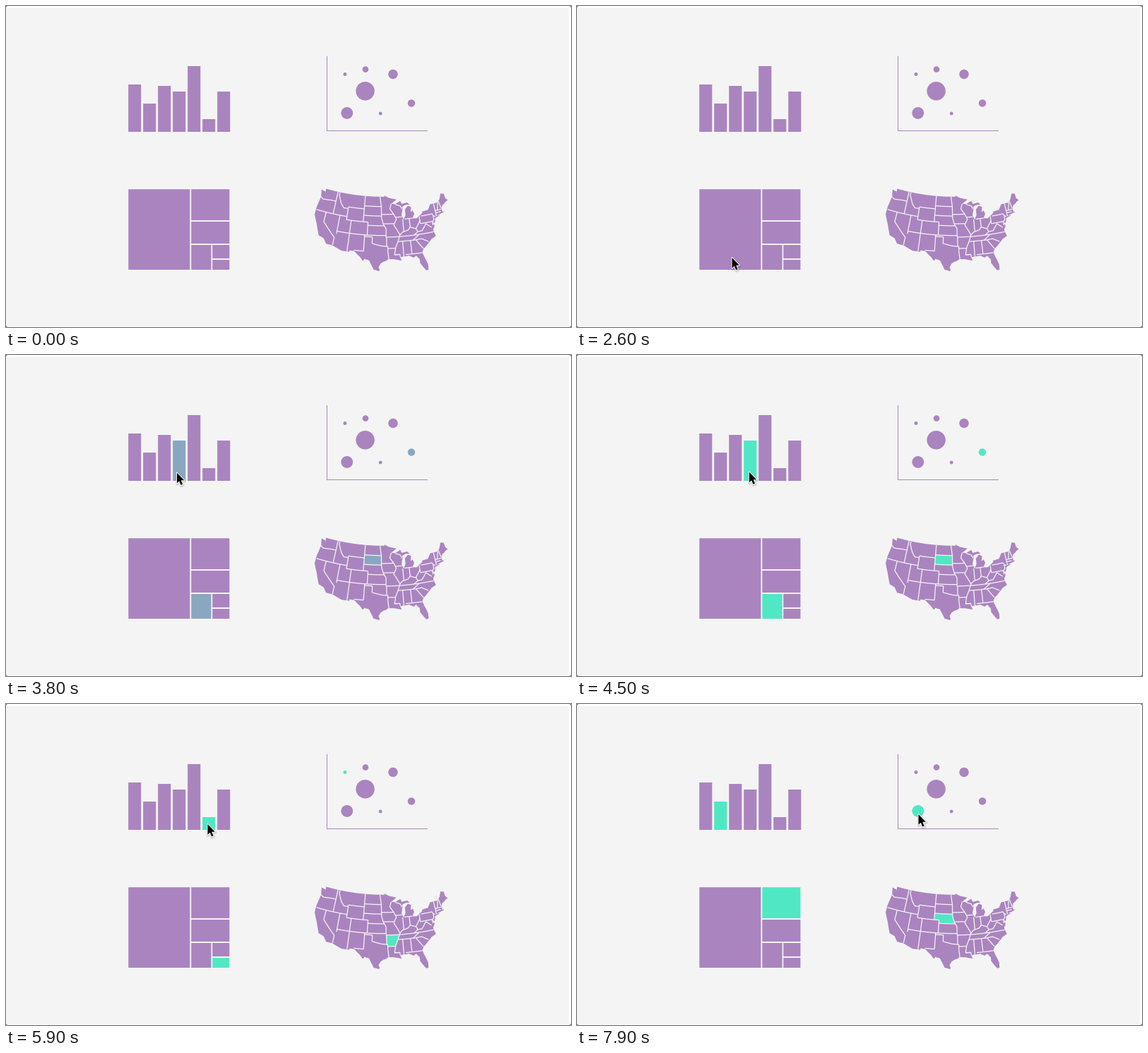
These frames come from a looping animation (800 px wide and 454 px high, 8 s). A matplotlib script:

```python
import numpy as np
import matplotlib.pyplot as plt
from matplotlib.animation import FuncAnimation
from matplotlib.collections import LineCollection
from matplotlib.patches import Circle, FancyBboxPatch, Polygon, Rectangle

W, H, DPI = 800, 454, 100
STEP, FRAMES = 100, 80
PX = 72 / DPI
PAPER = "#f4f4f4"
PURPLE = np.array([170, 132, 191]) / 255
TEAL = np.array([80, 232, 196]) / 255

# Map key points: (degrees west, degrees north)
LAKES = [
    (124.7, 48.38), (122.7, 48.1), (122.5, 47.2), (122.75, 49), (95.15, 49),
    (95.15, 49.38), (93, 48.6), (89.6, 48), (92.1, 46.75), (90.4, 46.6),
    (87.9, 47.47), (87.4, 46.5), (84.9, 46.75), (83.9, 46), (85.5, 46.1),
    (87, 45.75), (88, 44.55), (87.1, 45.2), (87.9, 43), (87.2, 41.65),
    (86.2, 42.9), (86.2, 44.7), (84.7, 45.75), (83.4, 45.2), (83.9, 43.7),
    (82.9, 44.05), (82.45, 43), (83.4, 41.7), (81.7, 41.5), (78.9, 42.9),
    (79.05, 43.27), (76.3, 43.5), (74.9, 45), (71.5, 45), (70.4, 45.8),
    (69.2, 47.45), (67.8, 47.07), (67.8, 45.7),
]
COAST = [
    (67, 44.85), (70, 43.75), (70.7, 42.65), (70.6, 41.8), (70, 42),
    (70, 41.6), (73.6, 41), (72, 41.05), (74, 40.5), (74.9, 38.95),
    (75.5, 39.5), (75.1, 38.3), (76, 36.9), (75.5, 35.25), (77.95, 33.9),
    (80.9, 32.05), (81.45, 30.7), (80.05, 26.8), (80.4, 25.2), (81.15, 25.15),
    (82.75, 27.8), (82.7, 28.9), (83.9, 30.05), (85.3, 29.7), (86.3, 30.4),
    (89.6, 30.15), (89.2, 29.1), (91.8, 29.6), (93.8, 29.7), (96.5, 28.4),
    (97.35, 27.4), (97.15, 25.95), (99.1, 26.4), (100.7, 29.1), (102.4, 29.77),
    (103.1, 28.98), (104.9, 30.6), (106.5, 31.75),
]
PACIFIC = [
    (108.2, 31.78), (108.2, 31.33), (111.07, 31.33), (114.8, 32.5), (117.1, 32.53),
    (118.5, 34.03), (120.6, 34.55), (122.5, 37.75), (124.4, 40.4), (124.5, 42.8),
    (123.95, 46.2), (124.7, 48.38),
]
PLAINS = [(97.2, 49), (96.56, 45.94), (96.45, 42.5), (95.75, 40.6), (94.62, 39.1), (94.62, 36.5)]
MISSISSIPPI = [
    (92.1, 46.75), (92.8, 45.2), (91.2, 43.5), (90.2, 41.9), (91.4, 40.2), (90.2, 38.6),
    (89.15, 37), (90.1, 35), (91.1, 33.2), (91.6, 31), (89.7, 30.99), (89.6, 30.15),
]
WINDING = [
    PLAINS, MISSISSIPPI,
    [(120, 39), (114.63, 35), (114.7, 32.6)],
    [(116.05, 49), (116.05, 48), (114.4, 45.6), (113, 44.45), (111.05, 44.5)],
    [(123.95, 46.2), (122.8, 45.65), (119, 46), (117, 46)],
    [(100, 34.5), (96.5, 33.8), (94.04, 33.6), (94.04, 32), (93.75, 29.7)],
    [(89.15, 37), (88.05, 37.8), (85.7, 38.3), (84.8, 39.1), (82.6, 38.4), (80.52, 40.64)],
    [(90.4, 46.55), (88.1, 45.9), (87.6, 45.1)],
    [(82.6, 38.4), (82, 37.4), (80.3, 37.5), (78.3, 39.4), (76.3, 37.95)],
    [(82, 37.4), (83.7, 36.5)],
    [(81.7, 36.5), (84.3, 35)],
    [(83.1, 35), (81, 35.1), (78.55, 33.87)],
    [(83.2, 35), (80.9, 32.05)],
    [(75, 42), (74.7, 41.36), (74.75, 40.2), (75.5, 39.6)],
    [(74.7, 41.36), (73.9, 41)],
    [(71.5, 45), (72.46, 42.72)],
    [(71.08, 45.3), (70.7, 43.07)],
]
PARALLELS = [  # north, west, east
    (42, 124.2, 111.05), (37, 114.04, 94.62), (45, 111.05, 104.05), (41, 111.05, 102.05),
    (40, 102.05, 95.3), (45.94, 104.05, 96.56), (43, 104.05, 96.45), (43.5, 96.45, 91.2),
    (40.6, 95.75, 91.3), (36.5, 94.62, 75.9), (36.5, 103, 100), (35, 90.1, 83.1),
    (33, 94.04, 91.15), (32, 106.6, 103.04), (31, 91.6, 89.7), (30.8, 87.6, 81.5),
    (42.5, 90.6, 87.8), (41.75, 86.8, 83.4), (39.72, 80.52, 75.6), (42, 79.76, 75),
    (42.04, 73.5, 71.2), (42.72, 73.3, 70.8),
]
MERIDIANS = [  # west, south, north
    (117, 42, 49), (120, 39, 42), (114.04, 36.2, 42), (111.05, 41, 45), (109.05, 31.33, 41),
    (104.05, 41, 49), (103.04, 32, 37), (102.05, 37, 41), (100, 34.5, 36.5),
    (94.45, 33.6, 36.5), (88.3, 30.3, 35), (87.53, 38, 41.7), (85.3, 31, 35),
    (84.81, 39.1, 41.7), (80.52, 39.72, 41.98), (75.6, 38.5, 39.72), (73.4, 41, 45),
]
# Regions that light up, by item: western edge from south to north, eastern river
REGIONS = {
    0: ([(94.62, 36.5), (94.62, 39.1), (95.75, 40.6)], MISSISSIPPI),
    1: ([(102.05, 40), (102.05, 41), (104.05, 41), (104.05, 43)], PLAINS),
    3: ([(104.05, 43), (104.05, 45.94)], PLAINS),
    5: ([(94.04, 33), (94.45, 33.6), (94.62, 36.5)], MISSISSIPPI),
}

BAR_TOPS = [111, 138, 113, 121, 85, 160, 121]
CELLS = [  # left, top, right, bottom
    (173.3, 259.2, 260.4, 373), (262.3, 259.2, 316.4, 303), (262.3, 305, 316.4, 336),
    (262.3, 338, 290.5, 373), (292.3, 338, 316.4, 357), (292.3, 359, 316.4, 373),
]
BUBBLES = [  # x, y, radius
    (508.6, 120.3, 13.2), (482.8, 151.4, 8.4), (548, 96.5, 6.7), (574, 137.5, 5.2),
    (509, 89.6, 4.3), (480, 96.5, 2.5), (530.2, 152, 2.4),
]

# Item, pointer enters, pointer leaves (ms)
HOVERS = [(0, 2650, 3300), (3, 3640, 4500), (5, 5175, 6150), (1, 7450, 9000)]
FADE = 400

# Pointer stops: ms, x, y
STOPS = np.array([
    (1000, 211, 446), (1800, 219, 366), (2600, 220, 357), (3300, 216.7, 231),
    (3800, 242.5, 167.5), (4400, 243, 164), (4900, 262, 188), (5300, 285, 176.5),
    (5900, 286, 171), (6700, 340.5, 227), (7100, 358, 228), (7500, 478, 160),
    (7900, 484, 157),
])
NUDGE = np.array([-0.5, -1])
ARROW = 1.06 * np.array([(0, 0), (0, 14), (3.1, 11.1), (5.3, 16.4), (7.7, 15.4), (5.5, 10.2), (9.8, 10.1)])


def split(points, parts):
    pts = np.array(points, float)
    i = np.arange(len(pts))
    k = np.linspace(0, len(pts) - 1, (len(pts) - 1) * parts + 1)
    return np.column_stack([np.interp(k, i, pts[:, 0]), np.interp(k, i, pts[:, 1])])


def rough(points, size=0.07):
    """Break up a coastline with small seeded offsets."""
    pts = split(points, 3)
    return (pts + np.random.default_rng(4).normal(0, size, pts.shape)).tolist()


def project(points):
    """Albers equal-area conic, subdivided so that parallels curve."""
    west, lat = split(points, 6).T
    s1, s2 = np.sin(np.radians([29.5, 45.5]))
    n = (s1 + s2) / 2
    c = 1 - s1 ** 2 + 2 * n * s1
    rho = np.sqrt(c - 2 * n * np.sin(np.radians(lat))) / n
    theta = n * np.radians(96 - west)
    return np.column_stack([533.2 + 261 * rho * np.sin(theta),
                            -17.8 + 261 * rho * np.cos(theta)])


def region(edge, river):
    """Close a western edge with the stretch of river at the same latitudes."""
    west, lat = np.array(river[::-1]).T
    north = np.linspace(edge[-1][1], edge[0][1], 16)
    bank = list(zip(np.interp(north, lat, west), north))
    return edge + bank + edge[:1]


def smooth(u):
    u = min(max(u, 0), 1)
    return u * u * (3 - 2 * u)


def glow(item, t):
    return max([smooth((t - enter) / FADE) - smooth((t - leave) / FADE)
                for who, enter, leave in HOVERS if who == item], default=0)


def pointer(t):
    """Smooth monotone path through the stops."""
    times, pos = STOPS[:, 0], STOPS[:, 1:]
    speed = np.diff(pos, axis=0) / np.diff(times)[:, None]
    a, b = speed[:-1], speed[1:]
    same = a * b > 0
    slope = np.zeros_like(pos)
    slope[1:-1] = np.where(same, 2 * a * b / np.where(same, a + b, 1), 0)
    i = min(max(np.searchsorted(times, t, "right") - 1, 0), len(times) - 2)
    span = times[i + 1] - times[i]
    u = min(max((t - times[i]) / span, 0), 1)
    s = smooth(u)
    return (pos[i] * (1 - s) + pos[i + 1] * s
            + span * u * (1 - u) * (slope[i] * (1 - u) - slope[i + 1] * u))


fig = plt.figure(figsize=(W / DPI, H / DPI), dpi=DPI, facecolor="#6b6b6b")
ax = fig.add_axes([0, 0, 1, 1])
ax.set_xlim(0, W)
ax.set_ylim(H, 0)
ax.axis("off")


def add(patch, z=2):
    patch.set(zorder=z, snap=False)
    return ax.add_patch(patch)


def panel(x, y, w, h, radius, color, z):
    style = f"round,pad=0,rounding_size={radius}"
    add(FancyBboxPatch((x, y), w, h, boxstyle=style, fc=color, lw=0), z)


panel(0, 0, W, H, 3, "white", 0)
panel(0, 3, 797, 450, 2, PAPER, 1)

items = {i: [] for i in range(len(BAR_TOPS))}
for i, top in enumerate(BAR_TOPS):
    items[i].append(add(Rectangle((173.2 + 21 * i, top), 18.1, 178 - top, fc=PURPLE, lw=0)))
for i, (x0, y0, x1, y1) in enumerate(CELLS):
    items[i].append(add(Rectangle((x0, y0), x1 - x0, y1 - y0, fc=PURPLE, lw=0)))
for i, (x, y, r) in enumerate(BUBBLES):
    items[i].append(add(Circle((x, y), r, fc=PURPLE, lw=0)))

ax.plot([454.5, 454.5, 597], [71, 176.5, 176.5], color=PURPLE, lw=PX, snap=False,
        solid_capstyle="butt", solid_joinstyle="miter", zorder=2)

add(Polygon(project(LAKES + rough(COAST) + PACIFIC), fc=PURPLE, lw=0))
for i, shape in REGIONS.items():
    items[i].append(add(Polygon(project(region(*shape)), fc=PURPLE, lw=0), 3))
borders = (WINDING + [[(w, n), (e, n)] for n, w, e in PARALLELS]
           + [[(w, s), (w, n)] for w, s, n in MERIDIANS])
ax.add_collection(LineCollection([project(b) for b in borders], colors=PAPER,
                                 linewidths=1.25 * PX, zorder=4))

# Pointer: soft shadow, white rim, black arrow
shadows = [add(Polygon(ARROW, fc="none", ec="black", alpha=0.05, lw=w * PX, joinstyle="round"), 5)
           for w in (5, 4, 3)]
rim = add(Polygon(ARROW, fc="white", ec="white", lw=2 * PX, joinstyle="round"), 6)
arrow = add(Polygon(ARROW, fc="black", lw=0), 7)


def draw(frame):
    t = frame * STEP
    for i, parts in items.items():
        color = PURPLE + (TEAL - PURPLE) * glow(i, t)
        for part in parts:
            part.set_facecolor(color)
    tip = pointer(t) + NUDGE
    for layer in shadows + [rim, arrow]:
        layer.set_xy(ARROW + tip + ((0.5, 1.2) if layer in shadows else (0, 0)))
        layer.set_visible(t >= STOPS[0, 0])
    return []


anim = FuncAnimation(fig, draw, frames=FRAMES, interval=STEP, repeat=True,
                     repeat_delay=0, init_func=lambda: draw(0))
plt.show()
```
